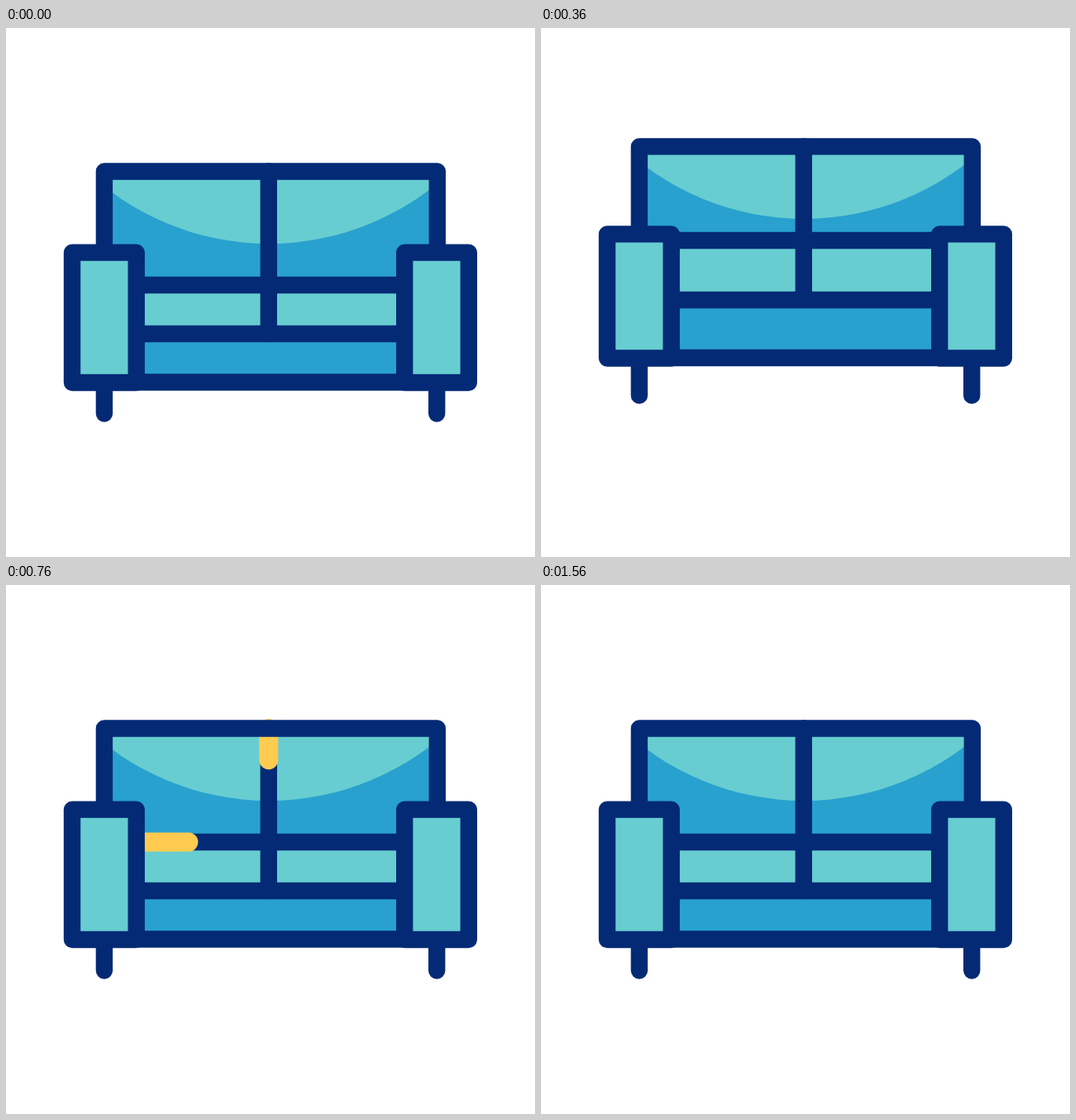
An HTML page with a canvas that plays this animation: 640x640 px, repeating every 2000 ms.

```html
<!DOCTYPE html>
<html lang="en">
<head>
<meta charset="utf-8">
<title>Sofa</title>
<style>
  html, body { margin: 0; width: 100%; height: 100%; overflow: hidden; background: #fff; }
  canvas { display: block; width: 640px; height: 640px; }
</style>
</head>
<body>
<canvas id="stage" width="640" height="640"></canvas>
<script>
const ctx = document.getElementById('stage').getContext('2d');
const LOOP = 2000, STEP = 40;
const NAVY = '#042a75', TEAL = '#67cdd1', BLUE = '#28a1ce', GOLD = '#fecb50';
const LINE = 20.4, GOLD_LINE = 23;

// Heights of each part: resting y, offset at the top of the jump, offset when squashed
const PARTS = {
  top:  [173.5, -37, 29],
  arm:  [271.6, -28, 28],
  seat: [311, -62, 15],
  base: [370, -46, 2],
  floor: [429, -33, 0],
  foot: [466.6, -24.5, 0]
};

const clamp = v => Math.min(1, Math.max(0, v));
const mix = (a, b, k) => a + (b - a) * k;
const smooth = (t, from, to) => {
  const u = clamp((t - from) / (to - from));
  return u * u * (3 - 2 * u);
};

// cubic-bezier(.33, 0, .4, 1) solved by bisection
function settle(t, from, to) {
  const x = clamp((t - from) / (to - from));
  let lo = 0, hi = 1;
  for (let i = 0; i < 24; i++) {
    const s = (lo + hi) / 2, r = 1 - s;
    if (3 * r * r * s * .33 + 3 * r * s * s * .4 + s * s * s < x) lo = s; else hi = s;
  }
  return lo * lo * (3 - 2 * lo);
}

function bounce(t, peak, squash) {
  if (t < 320) return peak * smooth(t, 120, 320);
  if (t < 520) return mix(peak, squash, smooth(t, 320, 520));
  return squash * (1 - settle(t, 520, 720));
}

function fillBox(x1, y1, x2, y2, color) {
  ctx.fillStyle = color;
  ctx.fillRect(x1, y1, x2 - x1, y2 - y1);
}

function line(points, color = NAVY, width = LINE, closed = false) {
  ctx.beginPath();
  points.forEach(([x, y]) => ctx.lineTo(x, y));
  if (closed) ctx.closePath();
  ctx.strokeStyle = color;
  ctx.lineWidth = width;
  ctx.stroke();
}

function drawBack(y) {
  const bottom = Math.max(y.arm, y.seat);
  fillBox(119, y.top, 522, bottom, BLUE);
  ctx.save();
  ctx.beginPath();
  ctx.rect(119, y.top, 403, bottom - y.top);
  ctx.clip();
  ctx.beginPath();
  ctx.arc(318, y.top - 233.5, 321, 0, Math.PI * 2);
  ctx.fillStyle = TEAL;
  ctx.fill();
  ctx.restore();
}

function drawGold(t) {
  if (t < 585 || t >= 1540) return;
  const head = smooth(t, 585, 1205), tail = smooth(t, 940, 1540);
  const drop = 48 * (1 - settle(t, 520, 720));
  const gold = (x1, y1, x2, y2) => line([
    [mix(x1, x2, tail), mix(y1, y2, tail) + drop],
    [mix(x1, x2, head) + .01, mix(y1, y2, head) + drop]
  ], GOLD, GOLD_LINE);
  gold(158, 311, 482, 311);
  gold(317.8, 173.5, 317.8, 370);
}

function drawArm(x1, x2, y) {
  fillBox(x1, y.arm, x2, y.floor, TEAL);
  line([[x1, y.arm], [x2, y.arm], [x2, y.floor], [x1, y.floor]], NAVY, LINE, true);
}

function draw(t) {
  const y = {};
  for (const name in PARTS) {
    const [rest, peak, squash] = PARTS[name];
    y[name] = rest + bounce(t, peak, squash);
  }
  ctx.lineCap = ctx.lineJoin = 'round';
  fillBox(0, 0, 640, 640, '#fff');

  drawBack(y);
  fillBox(158, y.seat, 482, y.base, TEAL);
  fillBox(158, y.base, 482, y.floor, BLUE);
  line([[158, y.seat], [482, y.seat]]);
  line([[317.8, y.top], [317.8, y.base]]);
  drawGold(t);

  line([[158, y.base], [482, y.base]]);
  line([[158, y.floor - .5], [482, y.floor - .5]]);
  line([[118.9, y.arm], [118.9, y.top], [521.8, y.top], [521.8, y.arm]]);
  for (const x of [118.9, 521.2]) line([[x, y.floor], [x, y.foot]]);
  drawArm(80, 157.7, y);
  drawArm(482.2, 559.8, y);
}

const start = performance.now();
function tick() {
  const t = (performance.now() - start) % LOOP;
  draw(Math.floor(t / STEP) * STEP);
  requestAnimationFrame(tick);
}
tick();
</script>
</body>
</html>
```
